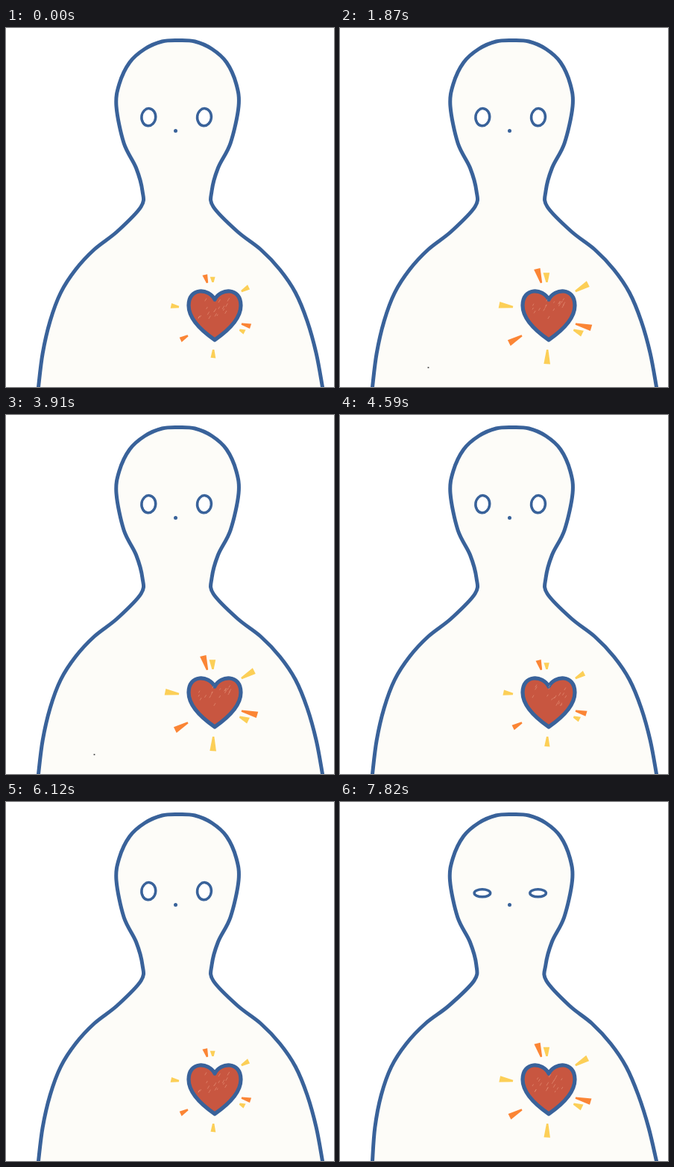
Recreate the animation shown at these times as an HTML page with a canvas. Size 440 by 480 pixels, loop 7990 ms.

```html
<!DOCTYPE html>
<html lang="en">
<head>
<meta charset="utf-8">
<title>Heartbeat</title>
<style>
  html, body { margin: 0; width: 100%; height: 100%; overflow: hidden; background: #fff; }
  canvas { display: block; }
</style>
</head>
<body>
<canvas id="stage" width="440" height="480"></canvas>
<script>
const ctx = document.getElementById('stage').getContext('2d');
const STEP = 170, STEPS = 47, CYCLE = 12;
const BLUE = '#39629a', CREAM = '#fdfcf8', RED = '#c85640', ORANGE = '#fb8535', YELLOW = '#fccf57';

// Half width of the body at key heights, from the crown to the hem.
const profile = [
  [18, 22], [28, 45], [46, 65], [75, 78.5], [105, 82], [154, 71.5], [187, 55], [218, 46.5], [239, 48.5],
  [272, 80.5], [296, 111.5], [323, 137], [354, 157.5], [392, 172.5], [435, 183.5], [480, 190.5], [500, 193]
];

// How far the head and the shoulders lean in each of the three redrawn poses.
const poses = [
  { head: 0, shoulders: 0 },
  { head: -2.5, shoulders: -3.5 },
  { head: -.5, shoulders: -4.5 }
];

const heart = { x: 280, y: 383, halfWidth: 35, notch: 363, tip: 417 };

const rays = [
  { angle: -102, reach: 43, length: 20, color: ORANGE },
  { angle: -92, reach: 43, length: 13, color: YELLOW },
  { angle: -40, reach: 48, length: 20, color: YELLOW },
  { angle: 19, reach: 39, length: 22, color: ORANGE },
  { angle: 31, reach: 40, length: 13, color: YELLOW },
  { angle: 91, reach: 47, length: 19.5, color: YELLOW },
  { angle: 141, reach: 45, length: 20, color: ORANGE },
  { angle: -168, reach: 48, length: 19, color: YELLOW }
];

function centerAt(y, { head, shoulders }) {
  const lean = y < 215
    ? head * Math.sin(Math.PI * y / 215)
    : shoulders * Math.sin(Math.PI * (y - 215) / 265);
  return 229.5 + 4.5 * ((y - 200) / 280) ** 2 + lean;
}

// Smooth curve through all points
function trace(points) {
  ctx.beginPath();
  ctx.moveTo(...points[0]);
  for (let i = 0; i < points.length - 1; i++) {
    const p = points[i], q = points[i + 1];
    const before = points[i - 1] || p, after = points[i + 2] || q;
    ctx.bezierCurveTo(
      p[0] + (q[0] - before[0]) / 6, p[1] + (q[1] - before[1]) / 6,
      q[0] - (after[0] - p[0]) / 6, q[1] - (after[1] - p[1]) / 6, ...q);
  }
}

function paint(fill, width) {
  ctx.fillStyle = fill;
  ctx.fill();
  ctx.strokeStyle = BLUE;
  ctx.lineWidth = width;
  ctx.stroke();
}

function dot(x, y, r, color) {
  ctx.beginPath();
  ctx.arc(x, y, r, 0, 7);
  ctx.fillStyle = color;
  ctx.fill();
}

function drawBody(pose) {
  const side = sign => profile.map(([y, half]) => [centerAt(y, pose) + sign * half, y]);
  trace([...side(-1).reverse(), [centerAt(16.5, pose), 16.5], ...side(1)]);
  paint(CREAM, 5);
}

function drawEyes(closing) {
  for (const x of [191.3, 266]) {
    ctx.beginPath();
    if (closing) ctx.ellipse(x - .4, 121.8, 10.8, 5, 0, 0, 7);
    else ctx.ellipse(x, 119.2, 9.4, 11.6, .1, 0, 7);
    paint('#fff', 3.5);
  }
}

function random(seed) {
  return () => {
    seed = (seed * 16807) % 2147483647;
    return seed / 2147483647;
  };
}

function drawHeart(beat) {
  const { x, y, halfWidth, notch, tip } = heart;
  ctx.beginPath();
  ctx.moveTo(x, tip);
  for (const side of [-1, 1]) {
    const edge = x + side * halfWidth;
    ctx.moveTo(x, notch);
    ctx.bezierCurveTo(x + side * 8, 347.5, edge, 346.5, edge, 371);
    ctx.bezierCurveTo(edge, 390, x + side * 16, 406, x, tip);
  }
  paint(RED, 5.2);

  // Chalky flecks
  const rnd = random(91 + beat * 37);
  ctx.strokeStyle = 'rgba(238, 165, 140, .55)';
  ctx.lineWidth = .9;
  ctx.beginPath();
  for (let i = 0; i < 18; i++) {
    const fx = x + (rnd() - .5) * 44, fy = y - 20 + rnd() * 26, length = 1 + rnd() * 3;
    ctx.moveTo(fx, fy);
    ctx.lineTo(fx + length * .6, fy - length);
  }
  ctx.stroke();
}

function drawRay({ angle, reach, length, color }, growth) {
  const a = angle * Math.PI / 180;
  const end = length * (.58 + .42 * growth), half = 3.4 + .9 * growth;
  ctx.save();
  ctx.translate(heart.x - 1 + reach * Math.cos(a), heart.y + reach * Math.sin(a));
  ctx.rotate(Math.atan2(.7 * Math.sin(a), Math.cos(a)));
  ctx.beginPath();
  ctx.moveTo(0, -1.2);
  ctx.lineTo(end, -half);
  ctx.lineTo(end - .5, half);
  ctx.lineTo(0, 1.2);
  ctx.closePath();
  ctx.fillStyle = color;
  ctx.fill();
  ctx.restore();
}

function draw(step) {
  const beat = step % CYCLE;
  const pose = poses[(beat + (beat > 7)) % 3];
  ctx.fillStyle = '#fff';
  ctx.fillRect(0, 0, 440, 480);
  ctx.lineJoin = ctx.lineCap = 'round';

  drawBody(pose);
  drawEyes(beat === 9 || beat === 10);
  dot(227.5, 137.5, 2.5, BLUE);
  if (beat === 11) dot(118.5, 454, 1.1, '#555');
  rays.forEach(ray => drawRay(ray, beat / (CYCLE - 1)));
  drawHeart(beat);
}

const start = performance.now();
function tick() {
  draw(Math.floor((performance.now() - start) / STEP) % STEPS);
  requestAnimationFrame(tick);
}
tick();
</script>
</body>
</html>
```
